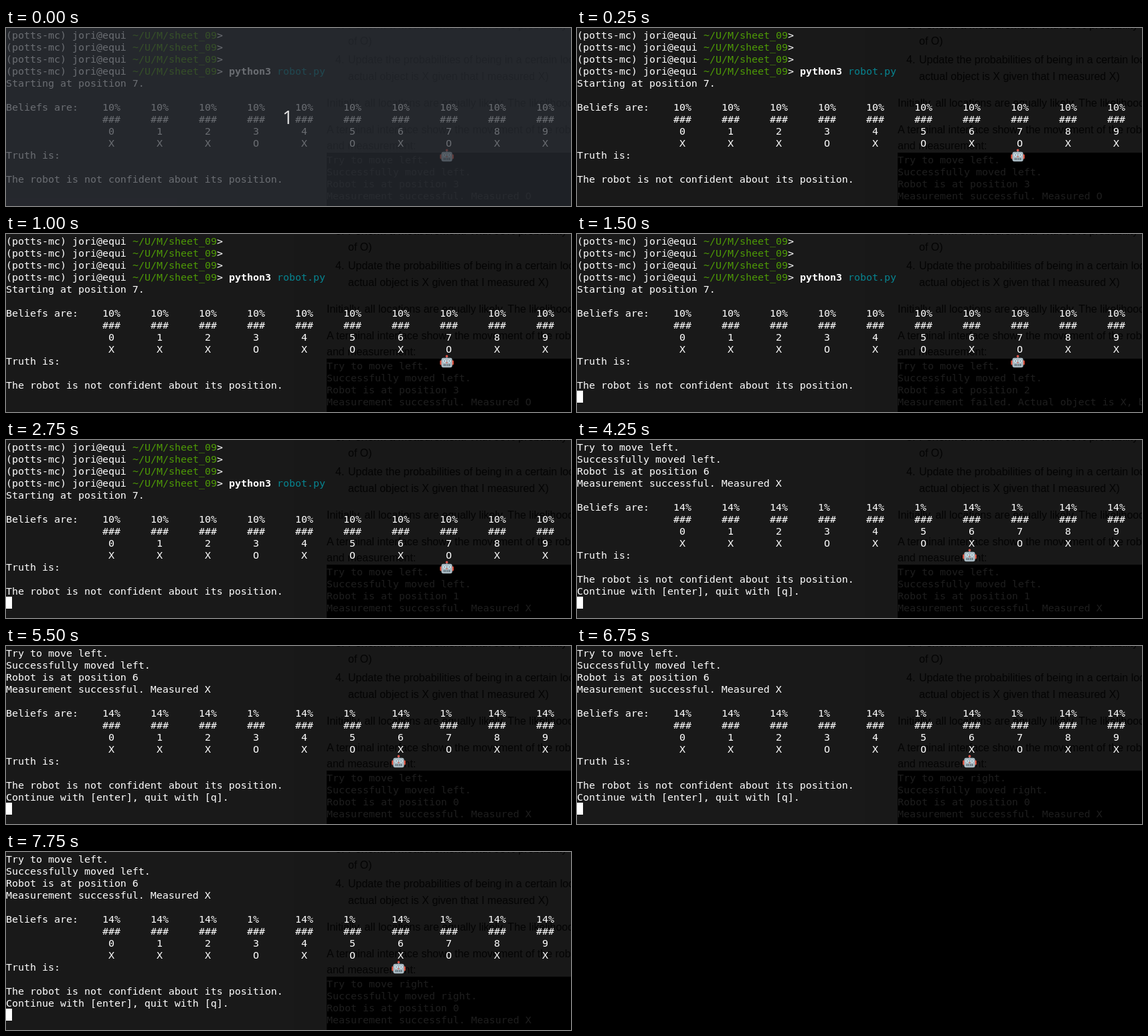
An HTML page that plays this animation: 844 by 267 pixels, repeating every 8 s.

```html
<!DOCTYPE html>
<html lang="en">
<head>
<meta charset="utf-8">
<title>Robot localisation in a terminal</title>
<style>
  html, body { margin: 0; width: 100%; height: 100%; overflow: hidden; background: #191919; }
  svg { display: block; width: 844px; height: 267px; }
  text { white-space: pre; }
  .mono { font: 14.95px "DejaVu Sans Mono", "Noto Sans Mono", monospace; fill: #fff; }
  .bold { font-weight: bold; }
  .path { fill: #4e9a06; }
  .arg { fill: #078490; }
  .page { font: 16px "Liberation Sans", Arial, sans-serif; fill: #040404; }
  .log .mono { fill: #1e1e1e; }
  .count { font: 28px "Open Sans", "Noto Sans", sans-serif; fill: #e4e4e4; text-anchor: middle; }
</style>
</head>
<body>
<svg viewBox="0 0 844 267">
  <rect width="844" height="267" fill="#191919"/>
  <rect x="430" width="414" height="267" fill="#181818"/>
  <g id="page"></g>
  <rect x="479" y="187" width="365" height="80"/>
  <g id="log" class="log"></g>
  <g id="before"></g>
  <g id="after"></g>
  <g id="robot">
    <rect x="9.6" y="2.5" width="1.8" height="4" fill="#8797a0"/>
    <circle cx="10.5" cy="2.2" r="1.8" fill="#e2574c"/>
    <rect x="0.2" y="8.5" width="3.6" height="7" rx="1.4" fill="#e0503c"/>
    <rect x="17.2" y="8.5" width="3.6" height="7" rx="1.4" fill="#e0503c"/>
    <rect x="2.4" y="4.8" width="16.2" height="14.4" rx="3" fill="#a9bac3"/>
    <circle cx="6.8" cy="9.6" r="2.1" fill="#f4fbfd"/>
    <circle cx="14.2" cy="9.6" r="2.1" fill="#f4fbfd"/>
    <circle cx="6.8" cy="9.6" r="1" fill="#3b6f86"/>
    <circle cx="14.2" cy="9.6" r="1" fill="#3b6f86"/>
    <path d="M10.5 10.6l1.2 2.2h-2.4z" fill="#d9503f"/>
    <rect x="5.6" y="14" width="9.8" height="3" rx="1.2" fill="#52656f"/>
    <path d="M8 14v3M10.5 14v3M13 14v3" stroke="#dfe8ec" stroke-width=".8"/>
  </g>
  <rect id="cursor" y="235" width="9" height="18" fill="#fff"/>
  <g id="countdown">
    <rect width="844" height="267" fill="#2b2f37" fill-opacity=".7"/>
    <text class="count" x="421" y="144">1</text>
  </g>
</svg>
<script>
const LOOP = 8000, CELL = 9, ROW = 18;
const $ = id => document.getElementById(id);

function addText(parent, cls, x, y, str) {
  const el = document.createElementNS("http://www.w3.org/2000/svg", "text");
  el.setAttribute("class", cls);
  el.setAttribute("x", x);
  el.setAttribute("y", y);
  el.textContent = str;
  parent.append(el);
  return el;
}

const cell = (parent, col, row, str, cls = "") =>
  addText(parent, "mono " + cls, col * CELL, 16 + row * ROW, str);

// Belief table, ten fields of eight columns each.
const WORLD = "XXXOXOXOXX";
function beliefs(parent, row, chance) {
  cell(parent, 0, row, "Beliefs are:");
  [...WORLD].forEach((object, i) => {
    const col = 16 + i * 8;
    cell(parent, col, row, chance(object));
    cell(parent, col, row + 1, "###");
    cell(parent, col + 1, row + 2, String(i));
    cell(parent, col + 1, row + 3, object);
  });
  cell(parent, 0, row + 4, "Truth is:");
  cell(parent, 0, row + 6, "The robot is not confident about its position.");
}

const before = $("before"), after = $("after");
for (let row = 0; row < 4; row++) {
  cell(before, 0, row, "(potts-mc) jori@equi");
  cell(before, 21, row, "~/U/M/sheet_09", "path");
  cell(before, 35, row, ">");
}
cell(before, 37, 3, "python3", "bold");
cell(before, 45, 3, "robot.py", "arg");
cell(before, 0, 4, "Starting at position 7.");
beliefs(before, 6, () => "10%");

["Try to move left.", "Successfully moved left.", "Robot is at position 6",
 "Measurement successful. Measured X"].forEach((line, i) => cell(after, 0, i, line));
beliefs(after, 5, object => object === "X" ? "14%" : "1%");
cell(after, 0, 12, "Continue with [enter], quit with [q].");

// Document showing through the terminal.
[
  [492, 1, "3."], [511, 1, "Perform a measurement. With 95% probability it"],
  [511, 25, "of O)"],
  [492, 53, "4."], [511, 53, "Update the probabilities of being in a certain location"],
  [511, 78, "actual object is X given that I measured X)"],
  [479, 118, "Initially, all locations are equally likely. The likelihood"],
  [479, 158, "A terminal interface shows the movement of the robot"],
  [479, 182, "and measurement:"]
].forEach(([x, y, str]) => addText($("page"), "page", x, y, str));

const logLines = [203, 221, 239, 257].map(y => addText($("log"), "mono", 479, y, ""));

const good = object => `Measurement successful. Measured ${object}`;
const FAILED = "Measurement failed. Actual object is X, but measured O";
const LOG = [
  [0, "left", 3, good("O")],
  [1250, "left", 2, FAILED],
  [2250, "left", 1, good("X")],
  [4500, "left", 0, good("X")],
  [5750, "left", 9, FAILED],
  [6750, "right", 0, good("X")]
];
const BLINKS = [500, 1000, 1500, 2250, 2750, 3500, 4000, 5000, 5500, 6250, 6750, 7250, 7750];
const STEP = 4250;

const show = (el, on) => el.setAttribute("visibility", on ? "visible" : "hidden");
let shownLog;

function draw(t) {
  const moved = t >= STEP;
  show(before, !moved);
  show(after, moved);
  $("robot").setAttribute("transform", moved ? "translate(576 163)" : "translate(648 181)");
  show($("cursor"), BLINKS.filter(b => b <= t).length % 2 === 1);
  show($("countdown"), t < 250);

  const entry = LOG.filter(e => e[0] <= t).pop();
  if (entry !== shownLog) {
    shownLog = entry;
    const [, way, place, result] = entry;
    [`Try to move ${way}.`, `Successfully moved ${way}.`, `Robot is at position ${place}`, result]
      .forEach((line, i) => logLines[i].textContent = line);
  }
}

const start = performance.now();
function tick() {
  draw((performance.now() - start) % LOOP);
  requestAnimationFrame(tick);
}
tick();
</script>
</body>
</html>
```
